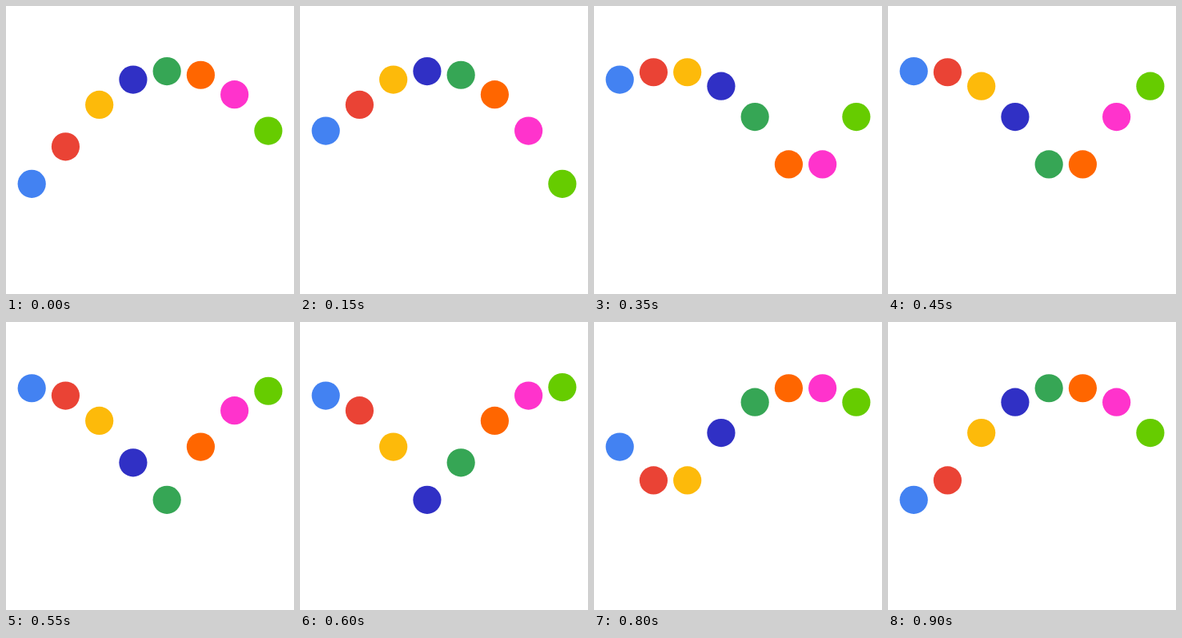
An HTML page with a canvas for the animation above (950 ms loop, 360 by 360 pixels).

```html
<!DOCTYPE html>
<html lang="en">
<head>
<meta charset="utf-8">
<title>Bouncing dots</title>
<style>
  html, body { margin: 0; width: 100%; height: 100%; overflow: hidden; background: #fff; }
  canvas { display: block; }
</style>
</head>
<body>
<canvas id="stage" width="360" height="360"></canvas>
<script>
const ctx = document.getElementById('stage').getContext('2d');
const colors = ['#4382f2', '#ea4335', '#fdba0a', '#3030c5', '#36a655', '#ff6600', '#ff33cc', '#66cc00'];
const LOOP = 950, TICK = 50, LAST_TICK = 18;
const CYCLE = 24, RADIUS = 17.6, TOP = 81.6, GRAVITY = 1.163;

// 24 bounce steps play in 19 ticks, always ending on the last step.
function stepAt(time) {
  const tick = Math.floor((time % LOOP) / TICK);
  return tick === LAST_TICK ? CYCLE - 1 : Math.floor(tick * 1.25);
}

// Twelve steps up and twelve down, pausing one step at each end.
function height(step) {
  const s = step % CYCLE;
  const fall = s < 12 ? 11 - s : s - 12;
  return TOP + GRAVITY * fall * fall;
}

function draw(time) {
  const step = stepAt(time);
  ctx.fillStyle = '#fff';
  ctx.fillRect(0, 0, 360, 360);
  colors.forEach((color, i) => {
    ctx.fillStyle = color;
    ctx.beginPath();
    ctx.arc(32.2 + i * 42.24, height(step + Math.max(0, 3 * i - 1)), RADIUS, 0, Math.PI * 2);
    ctx.fill();
  });
}

const start = performance.now();
function loop() {
  draw(performance.now() - start);
  requestAnimationFrame(loop);
}
loop();
</script>
</body>
</html>
```
